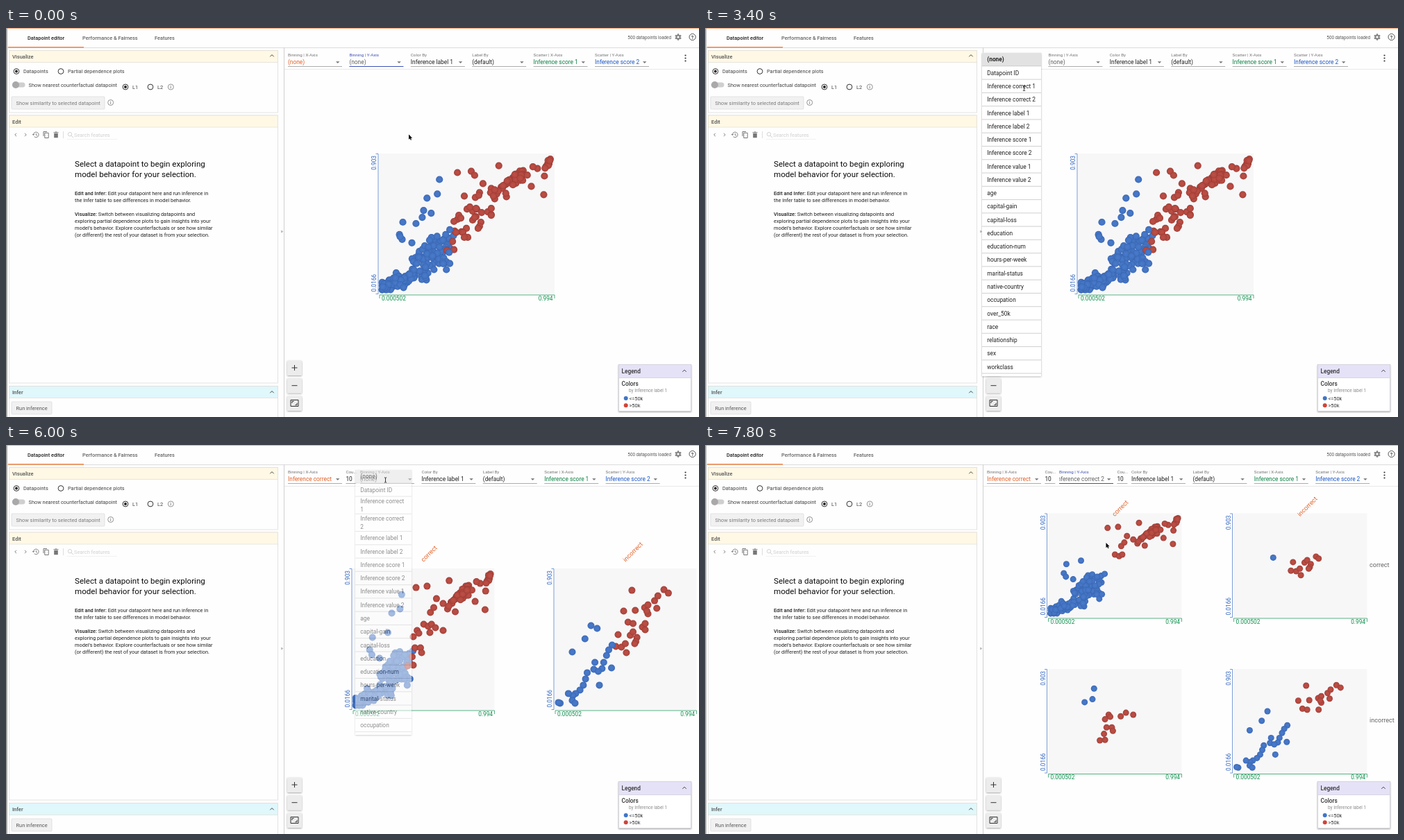
An HTML page that plays this animation: 998x561 px, repeating every 8000 ms.

```html
<!DOCTYPE html>
<html lang="en">
<head>
<meta charset="utf-8">
<title>Datapoint editor</title>
<style>
  html, body { margin: 0; width: 100%; height: 100%; overflow: hidden; background: #fff; }
  svg { display: block; }
  text { font-family: Roboto, "Noto Sans", sans-serif; white-space: pre; }
</style>
</head>
<body>
<svg width="998" height="561" viewBox="0 0 998 561">
  <defs>
    <radialGradient id="blue"><stop offset="0" stop-color="#4a7bca"/><stop offset=".75" stop-color="#4273c3"/><stop offset="1" stop-color="#3763ad"/></radialGradient>
    <radialGradient id="red"><stop offset="0" stop-color="#bd5047"/><stop offset=".75" stop-color="#b3483f"/><stop offset="1" stop-color="#983a33"/></radialGradient>
    <filter id="shadow" x="-20%" y="-20%" width="140%" height="140%"><feDropShadow dx="0" dy="1" stdDeviation="1" flood-opacity=".35"/></filter>
  </defs>
  <g id="page"></g>
  <g id="plots"></g>
  <g id="floating"></g>
  <g id="overlay"></g>
</svg>
<script>
const STEP = 200, STEPS = 40;
const layer = id => document.getElementById(id);

// ---- drawing helpers -------------------------------------------------
const text = (x, y, s, size = 7.4, fill = '#424242', attrs = '') =>
  `<text x="${x}" y="${y + size * 0.36}" font-size="${size}" fill="${fill}" ${attrs}>${s}</text>`;
const rect = (x, y, w, h, fill, attrs = '') =>
  `<rect x="${x}" y="${y}" width="${w}" height="${h}" fill="${fill}" ${attrs}/>`;
const line = (d, stroke, width = 1, attrs = '') =>
  `<path d="${d}" fill="none" stroke="${stroke}" stroke-width="${width}" ${attrs}/>`;
const shape = (d, fill) => `<path d="${d}" fill="${fill}"/>`;
const disc = (x, y, r, fill, attrs = '') =>
  `<circle cx="${x}" cy="${y}" r="${r}" fill="${fill}" ${attrs}/>`;
const ring = (x, y, r, stroke, width) => disc(x, y, r, 'none', `stroke="${stroke}" stroke-width="${width}"`);
const medium = 'font-weight="500"', bold = 'font-weight="700"', middle = 'text-anchor="middle"', end = 'text-anchor="end"';
const caret = (x, y) => line(`M${x - 2.7} ${y + 1.3}l2.7-2.7 2.7 2.7`, '#444', 1);

// ---- fixed page ------------------------------------------------------
function drawPage() {
  const header = (y, label, fill) =>
    rect(4.5, y, 387, 17, fill, 'stroke="#e0ddd4" stroke-width=".7"') + text(9, y + 9, label, 7.5, '#555', medium);
  const radio = (x, y, label, on) =>
    ring(x, y, 3.9, '#333', 1) + (on ? disc(x, y, 2, '#222') : '') + text(x + 10, y, label);
  const info = (x, y) =>
    ring(x, y, 4, '#666', .7) + line(`M${x} ${y - .6}v2.8M${x} ${y - 2.2}v1`, '#666', .8);
  const button = (y, w, label, fill) =>
    rect(8, y, w, 18, '#f1f1f1', 'stroke="#dcdcdc" stroke-width=".8" rx="1"') + text(14.5, y + 9, label, 7.4, fill);
  const frame = (y, h) => rect(4.5, y, 387, h, '#fefefe', 'stroke="#dcdcdc" stroke-width=".8"');

  const top = rect(0, 0, 998, 561, '#fefefe') + rect(0, 0, 2, 561, '#a3a3a3') + rect(2, 0, 996, 1, '#f7a26e') +
    line('M2 28.5H998', '#d4d4d4', .8) + rect(3, 27, 109, 1.6, '#f08a4d') +
    text(31, 14.5, 'Datapoint editor', 7.4, '#222', medium) +
    text(110, 14.5, 'Performance &amp; Fairness', 7.4, '#666', medium) +
    text(214, 14.5, 'Features', 7.4, '#666', medium) +
    text(958, 13.5, '500 datapoints loaded', 6.3, '#555', end) +
    line('M968 8.2v9.6M963.8 10.6l8.4 4.8M963.8 15.4l8.4-4.8', '#858585', 2) +
    disc(968, 13, 3.6, '#858585') + disc(968, 13, 1.6, '#fff') +
    ring(988.6, 13, 4.6, '#555', 1) + text(988.6, 13.2, '?', 7, '#444', `${middle} ${bold}`);

  const visualize = frame(32.5, 89.5) + header(32.5, 'Visualize', '#fff8e5') + caret(383, 40) +
    radio(15, 62.5, 'Datapoints', true) + radio(79, 62.5, 'Partial dependence plots') +
    rect(9, 78.5, 18.5, 7, '#cfcfcf', 'rx="3.5"') + disc(14, 82, 5, '#a9a9a9') +
    text(32.5, 82, 'Show nearest counterfactual datapoint') +
    radio(172, 85, 'L1', true) + radio(208, 85, 'L2') + info(237.3, 85) +
    button(99, 134, 'Show similarity to selected datapoint', '#7b7b7b') + info(150.7, 107.5);

  const tools = line('M15 151.8l-2.2 2.2 2.2 2.2M27 151.8l2.2 2.2-2.2 2.2', '#777', .9) +
    line('M39.5 154a3.8 3.8 0 1 1 1.2 2.7M38 153l1.5 1.8 1.6-1.8M43.4 152v2.4l1.8 1', '#777', .9) +
    line('M54 156v-6.5h5M55.8 151.3h5.4v7.2h-5.4z', '#777', 1) +
    shape('M69.2 152h5.6v6.2h-5.6zM68.5 150.2h2l.6-.8h1.8l.6.8h2v1h-7z', '#777') +
    line('M82.5 149v10', '#d5d5d5', .8) + ring(92, 153.2, 2.7, '#cfcfcf', .9) +
    line('M94 155.2l3 3', '#cfcfcf', 1) + line('M88 160.5H160', '#ececec', .7) +
    text(98, 154.3, 'Search features', 7.4, '#d0d0d0');
  const lines = [
    [238, `<tspan ${medium}>Edit and Infer:</tspan> Edit your datapoint here and run inference in`],
    [248, 'the Infer table to see differences in model behavior.'],
    [268, `<tspan ${medium}>Visualize:</tspan> Switch between visualizing datapoints and`],
    [278, 'exploring partial dependence plots to gain insights into your'],
    [288, 'model\u2019s behavior. Explore counterfactuals or see how similar'],
    [298, '(or different) the rest of your dataset is from your selection.']];
  const edit = frame(126, 386) + header(126, 'Edit', '#fff8e5') + tools +
    text(99, 196.3, 'Select a datapoint to begin exploring', 11.6, '#0c0c0c') +
    text(99, 211.3, 'model behavior for your selection.', 11.6, '#0c0c0c') +
    lines.map(([y, s]) => text(99, y, s, 7.4, '#222')).join('');

  const infer = frame(516.5, 46) + header(516.5, 'Infer', '#e0f7fb') + caret(383, 525) +
    button(539, 58, 'Run inference', '#555');
  const right = line('M400.5 28V561', '#d0d0d0', 1) + line('M401 59.5H998', '#e4e4e4', .8) +
    text(397.3, 293.5, '\u00bb', 7.4, '#777', middle) +
    [39.5, 43.5, 47.5].map(y => disc(978.5, y, 1.1, '#333')).join('');
  layer('page').innerHTML = top + visualize + edit + infer + right;
}

function drawFloating() {
  const key = y => rect(405, y, 21, 21.5, '#ececec', 'rx="1" filter="url(#shadow)"');
  layer('floating').innerHTML = key(479.5) + key(505) + key(530.5) +
    line('M411.5 490h8M415.5 486v8M411.5 515.7h8', '#333', 1) +
    line('M410 536.5h11v9h-11zM412 541v-2.6h2.6M419 541v2.6h-2.6', '#333', 1) +
    rect(882, 485, 105, 68, '#fff', 'filter="url(#shadow)"') +
    rect(882.4, 485.4, 104.2, 67.2, '#fff', 'stroke="#c9c9d4" stroke-width=".8"') +
    rect(882.8, 485.8, 103.4, 18.4, '#e5e2f8') + line('M883 504.5h103', '#c9c9d4', .7) +
    text(886.5, 495, 'Legend', 8.3, '#333', medium) + caret(977, 494.5) +
    text(886.5, 513, 'Colors', 8.3, '#333', medium) +
    text(897, 523, 'by Inference label 1', 6.4, '#8a8a8a') +
    disc(892.7, 534, 3, '#3f76c6') + text(897.5, 534.3, '&lt;=50k', 7.4, '#333') +
    disc(892.7, 544.3, 3, '#d0453a') + text(897.5, 544.5, '&gt;50k', 7.4, '#333');
}

// ---- scatter data: raw units, y down, filling the EXTENT box ---------
const EXTENT = { x: 6, y: 5, w: 243, h: 192 };
let seed = 11;
const random = () => (seed = (seed * 16807) % 2147483647) / 2147483647;
const dots = [];
const add = (col, row, color, flat) => {
  for (let i = 0; i < flat.length; i += 2) dots.push({ col, row, color, x: flat[i], y: flat[i + 1] });
};
function cloud(col, row, color, n, x0, y0, x1, y1, spread) {
  for (let i = 0; i < n; i++) {
    const t = random(), jitter = () => (random() * 2 - 1) * spread;
    const x = Math.max(5, x0 + (x1 - x0) * t + jitter());
    const y = Math.min(197, y0 + (y1 - y0) * t + jitter());
    add(col, row, color, [x, y]);
  }
}
cloud(0, 0, 'blue', 65, 6, 194, 34, 182, 8);
cloud(0, 0, 'blue', 40, 28, 180, 66, 175, 9);
cloud(0, 0, 'blue', 22, 54, 160, 98, 152, 9);
cloud(0, 0, 'blue', 36, 60, 146, 100, 122, 12);
add(0, 0, 'blue', [35, 99, 63, 92, 30, 117, 34, 124, 48, 129, 98, 168, 103, 159]);
add(0, 0, 'red', [114, 27, 134, 25, 174, 17, 221, 47, 239, 59, 230, 21, 240, 32, 128, 80, 136, 83,
  142, 80, 140, 63, 146, 56, 151, 43, 163, 50, 171, 58, 185, 62]);
cloud(0, 0, 'red', 36, 174, 49, 218, 25, 7);
cloud(0, 0, 'red', 9, 241, 23, 248, 6, 2);
add(1, 0, 'blue', [76, 86]);
add(1, 0, 'red', [114, 95, 110, 112, 120, 113, 129, 121, 127, 108, 136, 96, 141, 91, 158, 84,
  163, 88, 148, 99, 146, 105, 144, 108]);
add(0, 1, 'blue', [88, 37, 85, 58, 70, 64]);
add(0, 1, 'red', [116, 89, 109, 98, 119, 93, 139, 92, 149, 85, 163, 89, 112, 114, 122, 114,
  124, 121, 107, 127, 99, 140, 109, 139]);
add(1, 1, 'blue', [65, 82, 54, 101, 31, 120, 103, 110, 97, 117, 93, 125, 72, 135, 88, 135,
  85, 144, 102, 143, 70, 145, 78, 148, 80, 168, 58, 150, 55, 159, 51, 168, 45, 175, 37, 180,
  32, 183, 31, 190, 36, 194, 24, 180, 9, 194, 6, 193]);
add(1, 1, 'red', [139, 31, 124, 61, 132, 77, 141, 79, 145, 60, 162, 56, 168, 52, 180, 46,
  186, 39, 197, 30, 205, 35, 184, 57, 168, 65, 163, 79, 166, 61]);

// ---- plot placement: cell size, column and row origins, dot radius ---
const layouts = [
  { from: 0, w: 253, h: 202, xs: [537, 537], ys: [181, 181], r: 5.1 },
  { from: 19, w: 205, h: 163, xs: [499, 499], ys: [200, 200], r: 4.6 },
  { from: 20, w: 205, h: 190, xs: [499, 715], ys: [184, 184], r: 4.8, rise: -9 },
  { from: 21, w: 204.5, h: 203, xs: [499, 790], ys: [178, 178], r: 5, rise: -9 },
  { from: 37, w: 176, h: 174, xs: [493.5, 743.5], ys: [298, 298], r: 4.4, rise: -8 },
  { from: 38, w: 190, h: 156, xs: [493.5, 755], ys: [148, 317], r: 4.4, rise: 2 },
  { from: 39, w: 193, h: 149.5, xs: [493.5, 760.5], ys: [98.5, 323], r: 4.5, rise: 5 }];
const names = ['correct', 'incorrect'];
const AXIS_X = '#0b8f4a', AXIS_Y = '#2f64c0', ORANGE = '#e2622a';

function axes(x, y, { w, h }) {
  const base = y + h + 2;
  const upright = (s, ty, attrs) =>
    `<g transform="translate(${x - 6.7} ${ty}) rotate(-90)">${text(0, 0, s, 8.3, AXIS_Y, attrs)}</g>`;
  return rect(x, y, w, h + 2, '#f7f7f8') +
    line(`M${x - 4.5} ${y + .5}h3.5v${h}h-3.5`, AXIS_Y, .8, 'opacity=".8"') +
    line(`M${x + 1} ${base + 5}v-5h${w - 1}v5`, AXIS_X, .8, 'opacity=".85"') +
    upright('0.903', y + 3, end) + upright('0.0166', y + h - 2.5, '') +
    text(x + 4, base + 5, '0.000502', 8.3, AXIS_X) + text(x + w - 2.5, base + 5, '0.994', 8.3, AXIS_X, end);
}

function drawPlots(step) {
  const lay = layouts.findLast(l => step >= l.from);
  const { w, h, xs, ys, r, rise } = lay;
  const cols = [...new Set(xs)], rows = [...new Set(ys)];
  const pad = r + .6;
  const place = (origin, size, value, from, extent) =>
    (origin + pad + (value - from) / extent * (size - 2 * pad)).toFixed(1);
  let out = rows.map(y => cols.map(x => axes(x, y, lay)).join('')).join('');
  out += dots.map(d => disc(place(xs[d.col], w, d.x, EXTENT.x, EXTENT.w),
    place(ys[d.row], h, d.y, EXTENT.y, EXTENT.h), r, `url(#${d.color})`)).join('');
  if (cols.length > 1) cols.forEach((x, i) => {
    out += `<g transform="translate(${x + w / 2} ${ys[0] + rise}) rotate(-45)">${text(0, -3.3, names[i], 9.1, ORANGE)}</g>`;
  });
  if (rows.length > 1) rows.forEach((y, i) => { out += text(957, y + 74.2, names[i], 9.1, '#666'); });
  layer('plots').innerHTML = out;
}

// ---- selectors above the plot ----------------------------------------
const PITCH = 88.4, FOCUS = '#3f51b5';

function selector(x, label, value, fill, { focused, wide = 78 } = {}) {
  const scrolled = focused && value.length > 17;
  const inner = scrolled ? text(65, 9, value, 8.35, fill, end) : text(0, 9, value, 8.35, fill);
  return text(x, 38.3, label, 6.25, focused ? FOCUS : '#757575') +
    `<svg x="${x}" y="40" width="65" height="15">${inner}</svg>` +
    line(`M${x} 55.5h${wide}`, focused ? FOCUS : '#8a8a8a', focused ? 1.2 : .7) +
    (wide > 20 ? shape(`M${x + 69} 48.2h5.4l-2.7 2.7z`, '#777') : '');
}

function selectors(step) {
  const binX = step >= 18, binY = step >= 36;
  const focusX = step >= 18 && step < 29, focusY = step < 6 || binY;
  const fields = [
    ['Binning | X-Axis', binX ? 'Inference correct 1' : '(none)', ORANGE, focusX, binX],
    ['Binning | Y-Axis', binY ? 'Inference correct 2' : '(none)', '#616161', focusY, binY],
    ['Color By', 'Inference label 1', '#212121'],
    ['Label By', '(default)', '#212121'],
    ['Scatter | X-Axis', 'Inference score 1', '#0b8043'],
    ['Scatter | Y-Axis', 'Inference score 2', '#1a56c4']];
  let x = 406, out = '';
  if (step === 6 || step === 7) out += rect(406, 35, 78, 20.5, '#fbd8ca', step === 6 ? 'opacity=".5"' : '');
  if (step === 29) out += rect(510, 35, 78, 20.5, '#e2e2e2');
  for (const [label, value, fill, focused, counted] of fields) {
    out += selector(x, label, value, fill, { focused });
    x += PITCH;
    if (counted) {
      out += selector(x - 5, 'Cou...', '10', '#212121', { wide: 15 });
      x += 15.6;
    }
  }
  return out;
}

// ---- drop-down list --------------------------------------------------
const numbered = ['correct', 'label', 'score', 'value'].flatMap(k => [`Inference ${k} 1`, `Inference ${k} 2`]);
const items = ['(none)', 'Datapoint ID', ...numbered, 'age', 'capital-gain', 'capital-loss', 'education',
  'education-num', 'hours-per-week', 'marital-status', 'native-country', 'occupation', 'over_50k', 'race',
  'relationship', 'sex', 'workclass'];

function menu(x, { selected = 0, wrapped = [], width = 85, bottom, opacity = 1 }) {
  const top = 35.6;
  let y = 0, rows = '';
  items.forEach((item, i) => {
    const split = wrapped.includes(i), h = split ? 25.2 : 19.27, mid = y + h / 2;
    const attrs = i === selected ? bold : '';
    if (i === 0 && selected === 0) rows += rect(0, y, width, h, '#e2e2e2');
    if (split) {
      rows += text(7.3, mid - 6.2, item.slice(0, -2), 8.35, '#222', attrs) +
        text(7.3, mid + 6.2, item.slice(-1), 8.35, '#222', attrs);
    } else rows += text(7.3, mid + .2, item, 8.35, '#222', attrs);
    y += h;
    rows += line(`M0 ${y}h${width}`, '#c4c4c4', .8);
  });
  const height = bottom ? bottom - top : y + 4;
  return `<g opacity="${opacity}">` + rect(x, top, width, height, '#fff', 'filter="url(#shadow)"') +
    `<svg x="${x}" y="${top}" width="${width}" height="${height}">${rows}</svg></g>`;
}

const opening = { wrapped: [2, 3], width: 81, bottom: 418, opacity: .5 };
const picked = i => ({ selected: i, wrapped: [i] });
const menuStates = [
  { from: 8, x: 399, ...opening }, { from: 9, x: 399 }, { from: 18, x: 399, ...picked(2) },
  { from: 20, x: 399, ...picked(2), opacity: .3 }, { from: 21 },
  { from: 30, x: 503, ...opening }, { from: 31, x: 503 }, { from: 36, x: 503, ...picked(3) },
  { from: 38, x: 503, ...picked(3), opacity: .3 }, { from: 39 }];

// ---- pointer: each move runs over steps first..last ------------------
const moves = [
  { first: 1, last: 6, x: 469, y: 46.5 }, { first: 12, last: 17, x: 459.5, y: 87 },
  { first: 24, last: 29, x: 546.5, y: 50.5 }, { first: 31, last: 35, x: 554.5, y: 104.5 },
  { first: 38, last: 39, x: 577.5, y: 141 }];

function pointer(step, menuOpen) {
  let x = 580, y = 153.5;
  for (const m of moves) {
    const t = Math.min(1, Math.max(0, (step - m.first + 1) / (m.last - m.first + 1)));
    const eased = t * t * (3 - 2 * t);
    x += (m.x - x) * eased;
    y += (m.y - y) * eased;
  }
  const beam = menuOpen || (y < 57 && y > 33);
  const d = beam ? 'M-1.6-3.6Q0-3.6 0-2.8V2.8Q0 3.6-1.6 3.6M1.6-3.6Q0-3.6 0-2.8M0 2.8Q0 3.6 1.6 3.6'
    : 'M0 0V7.2L1.7 5.7 2.8 8.3 4 7.8 2.9 5.3H5.1Z';
  return `<g transform="translate(${x} ${y})">` + (beam ? line(d, '#222', .9)
    : `<path d="${d}" fill="#000" stroke="#fff" stroke-width=".8" paint-order="stroke"/>`) + '</g>';
}

// ---- playback --------------------------------------------------------
function drawOverlay(step) {
  const state = menuStates.findLast(m => step >= m.from) || {};
  const open = state.x !== undefined;
  layer('overlay').innerHTML = selectors(step) + (open ? menu(state.x, state) : '') +
    pointer(step, open && state.opacity !== .3);
}

let shown = -1;
function play() {
  const step = Math.floor(performance.now() / STEP) % STEPS;
  if (step !== shown) {
    shown = step;
    drawPlots(step);
    drawOverlay(step);
  }
  requestAnimationFrame(play);
}
drawPage();
drawFloating();
play();
</script>
</body>
</html>
```
